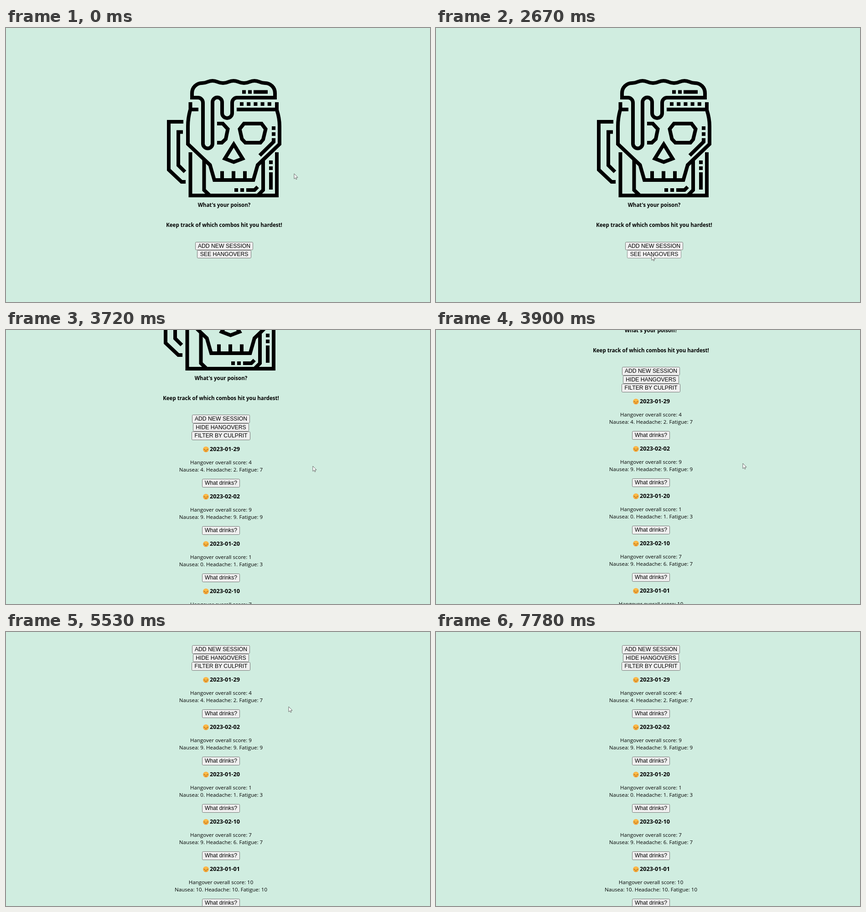
Animation, 930 px wide and 602 px high, one loop 8 s. Source, as an HTML page:

```html
<!DOCTYPE html>
<html lang="en">
<head>
<meta charset="utf-8">
<title>Hangover tracker</title>
<style>
  html, body { margin: 0; width: 100%; height: 100%; overflow: hidden; background: #d0ede0; }
  svg { display: block; }
  text { font: 11.5px "Open Sans", "Noto Sans", sans-serif; text-anchor: middle; fill: #000; }
  .bold { font-weight: 700; }
  .date { font-weight: 700; font-size: 12.65px; text-anchor: start; }
  .btn rect { fill: #efefef; stroke: #767676; }
  .btn text { font: 12.2px "Liberation Sans", Arial, sans-serif; }
  .btn.hover rect { fill: #e5e5e5; stroke: #4f4f4f; }
  .btn.press rect { fill: #f5f5f5; stroke: #8d8d8d; }
  .ink { fill: none; stroke: #000; stroke-width: 8; }
</style>
</head>
<body>
<svg width="930" height="602" viewBox="0 0 930 602">
  <defs>
    <radialGradient id="skin" cx=".5" cy=".35" r=".7">
      <stop offset="0" stop-color="#ffc04a"/>
      <stop offset="1" stop-color="#f9a233"/>
    </radialGradient>
    <g id="sad">
      <circle r="6.3" fill="url(#skin)"/>
      <path d="M-4.7-.4Q-3 1-1.2.2M4.7-.4Q3 1 1.2.2M-1.8 3.4Q0 2.6 1.8 3.4"
        fill="none" stroke="#6b4419" stroke-width=".9"/>
    </g>
  </defs>
  <g id="page">
    <g id="head">
      <g class="ink">
        <path id="foam"/>
        <path d="M518 140.5H574" stroke-dasharray="8 5 8 4 31"/>
        <!-- rim -->
        <path d="M404.5 163V179H422M594 163V179H506"/>
        <path d="M513 167H582" stroke-dasharray="8 7.2"/>
        <!-- face -->
        <path d="M404 180Q399 198 399 216V255L447.5 301L457 334H542.5L552 301L600 255V216Q600 198 594 180"/>
        <path d="M470 324H528" stroke-width="19" stroke-dasharray="8 17"/>
        <path d="M499.5 255.5L480 287L499.5 294.5L519 287Z"/>
        <path d="M512.5 222L522 210H560.5L569.5 222L564 245L558 252H525L517.5 244Z"/>
        <path d="M463 210H475.5L486.5 222L482 244L473.5 252H463"/>
        <path d="M587 216V250L556.5 280" stroke-dasharray="8 5 8 5 60"/>
        <!-- mug -->
        <path d="M404.5 273V368H594V273"/>
        <path d="M434.5 290V356L447 368M564 290V356L552 368"/>
        <path d="M581 291V355" stroke-dasharray="8 5 8 5 60"/>
        <path d="M501 356H545L552 349" stroke-dasharray="8 5 8 5 60"/>
        <path d="M389 206H357V311.5L385 338H394M388 228.5H378V301.5L392.5 316"/>
      </g>
      <text class="bold" x="478.5" y="393">What's your poison?</text>
      <text class="bold" x="478.5" y="437">Keep track of which combos hit you hardest!</text>
    </g>
    <g id="start"></g>
    <g id="list"></g>
  </g>
  <path id="cursor" d="M0 0V11.4L2.6 9L4.3 12.7L6 12L4.4 8.3H8Z" fill="#fff" stroke="#444" stroke-width=".8"/>
</svg>
<script>
const LOOP = 8000;
const FRAME = 76;
const $ = id => document.getElementById(id);

function add(parent, tag, attrs, label) {
  const el = document.createElementNS("http://www.w3.org/2000/svg", tag);
  for (const k in attrs) el.setAttribute(k, attrs[k]);
  if (label) el.textContent = label;
  parent.append(el);
  return el;
}

function button(parent, label, x, y, w, h) {
  const g = add(parent, "g", { class: "btn" });
  add(g, "rect", { x, y, width: w, height: h, rx: 2 });
  add(g, "text", { x: x + w / 2, y: y + 12.7 }, label);
  return g;
}

// domed top with three waves, then the drips from right to left
$("foam").setAttribute("d",
  "M408 153V143A22 22 0 0 1 430 121" + "c12 0 12-5 23-5s11 5 23 5".repeat(3) +
  "A22 22 0 0 1 590 143V153H507A11 11 0 0 0 496 164V187A11 11 0 0 1 474 187" +
  "V163A10.5 10.5 0 0 0 453 163V254A10.5 10.5 0 0 1 432 254V164A11 11 0 0 0 421 153Z");

const addBtn = button($("start"), "ADD NEW SESSION", 415.5, 470.5, 126, 17);
const seeBtn = button($("start"), "SEE HANGOVERS", 419.5, 488.5, 118, 17);

const list = $("list");
button(list, "ADD NEW SESSION", 408.5, 372.5, 126, 18);
button(list, "HIDE HANGOVERS", 410.5, 391.5, 122, 17);
button(list, "FILTER BY CULPRIT", 407.5, 409.5, 128, 18);

const entries = [
  "2023-01-29: overall 4, nausea 4, headache 2, fatigue 7",
  "2023-02-02: overall 9, nausea 9, headache 9, fatigue 9",
  "2023-01-20: overall 1, nausea 0, headache 1, fatigue 3",
  "2023-02-10: overall 7, nausea 9, headache 6, fatigue 7",
  "2023-01-01: overall 10, nausea 10, headache 10, fatigue 10"
];
const upper = add(list, "g", {});
const drinks = add(list, "g", {});
const lower = add(list, "g", {});
const drinkBtns = entries.map((entry, i) => {
  const [date, rest] = entry.split(": ");
  const [score, nausea, ache, tired] = rest.match(/\d+/g);
  const g = add(i < 2 ? upper : lower, "g", { transform: `translate(0 ${i * 104})` });
  add(g, "use", { href: "#sad", x: 438.5, y: 448.3 });
  add(g, "text", { class: "date", x: 447, y: 452.3 }, date);
  add(g, "text", { x: 471.5, y: 481 }, `Hangover overall score: ${score}`);
  add(g, "text", { x: 471.5, y: 497 }, `Nausea: ${nausea}. Headache: ${ache}. Fatigue: ${tired}`);
  return button(g, "What drinks?", 430.5, 513.5, 82, 18);
});
const drinkRows = ["Beer: 4", "Red wine: 2", "Tequila: 3", "Cider: 1", "Rum: 2"].map((s, i) =>
  add(drinks, "text", { x: 471.5, y: 669 + i * 29 }, s));

// pointer glides: start and end time, bend of the curve, place reached
const glides = [
  { from: 283, to: 1130, bend: [560, -160], end: [474, 473] },
  { from: 1130, to: 1500, bend: [473, 490], end: [473, 499] },
  { from: 3000, to: 3550, bend: [560, 370], end: [671, 298] },
  { from: 3550, to: 4080, bend: [676, 306], end: [669, 270] },
  { from: 4080, to: 4260, bend: [655, 220], end: [628, 172] },
  { from: 4260, to: 4980, bend: [622, 168], end: [620, 164] },
  { from: 5530, to: 6290, bend: [490, 400], end: [486, 278] },
  { from: 7500, to: 7780, bend: [487, 262], end: [488, 222] }
];

function progress(t, from, to) {
  const steps = Math.round((to - from) / FRAME);
  const u = Math.min(1, Math.max(0, (t - from) / (to - from)));
  return Math.floor(u * steps + 1e-6) / steps;
}

function pointer(t) {
  let pos = [632, 320];
  for (const { from, to, bend, end } of glides) {
    if (t < from) break;
    const u = progress(t, from, to), v = 1 - u;
    pos = pos.map((p, i) => Math.round(v * v * p + 2 * u * v * bend[i] + u * u * end[i]));
  }
  return pos;
}

const scrollAt = t => Math.round(343 * (1 - (1 - progress(t, 3550, 4150)) ** 2.72));
const within = (t, a, b) => t >= a && t < b;
const show = (el, on) => { el.style.display = on ? "" : "none"; };
const move = (el, x, y) => el.setAttribute("transform", `translate(${x} ${y})`);

function mood(el, hover, press) {
  el.setAttribute("class", "btn" + (press ? " press" : hover ? " hover" : ""));
}

function draw(t) {
  const open = t >= 2760;
  show($("start"), !open);
  show(list, open);
  move($("head"), open ? -7 : 0, open ? -97 : 0);
  move($("page"), 0, -scrollAt(t));

  mood(addBtn, within(t, 1130, 1350));
  mood(seeBtn, t >= 1350, t >= 2670);
  mood(drinkBtns[1], within(t, 6340, 7650), within(t, 6490, 6720) || within(t, 7160, 7230));

  const rows = !within(t, 6720, 7230) ? 0 : t < 6980 ? 4 : 5;
  drinkRows.forEach((row, i) => show(row, i < rows));
  move(lower, 0, rows && 9 + rows * 29);

  // no arrow while the pointer rests on text
  show($("cursor"), !within(t, 2760, 3080) && t < 7780);
  move($("cursor"), ...pointer(t));
}

const begin = performance.now();
function tick(now) {
  draw(Math.max(0, now - begin) % LOOP);
  requestAnimationFrame(tick);
}
draw(0);
requestAnimationFrame(tick);
</script>
</body>
</html>
```
